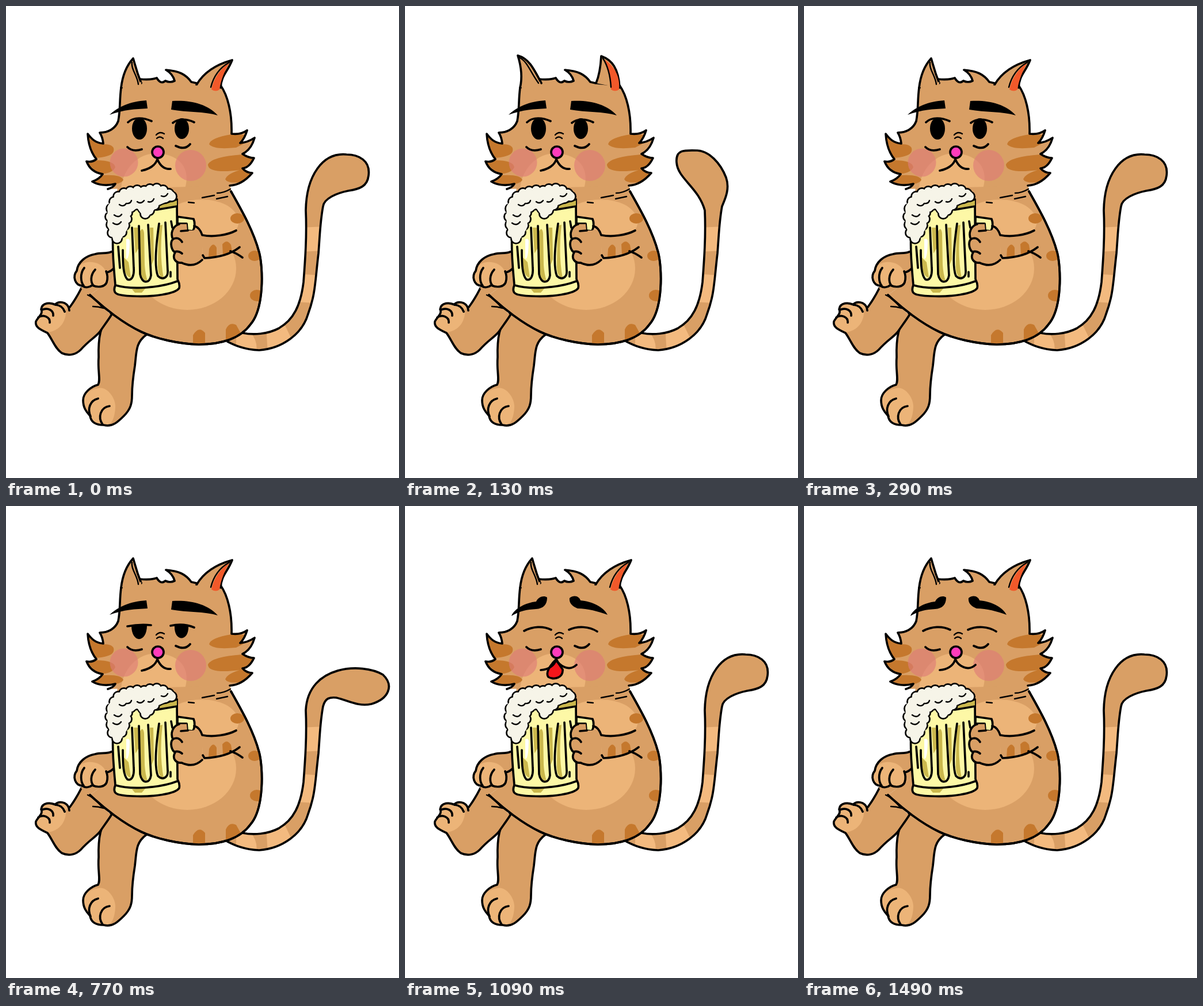
Recreate the animation shown at these times as an HTML page. Size 683 px wide and 820 px high, loop 1690 ms.

```html
<!DOCTYPE html>
<html lang="en">
<head>
<meta charset="utf-8">
<title>Cat with a mug</title>
<style>
  html, body { margin: 0; height: 100%; overflow: hidden; background: #fff; }
  svg { display: block; width: 100%; height: 100%; }
  path, circle { stroke-linecap: round; stroke-linejoin: round; }
  .fur { fill: #d99f65; }
  .light { fill: #ecb478; }
  .pale { fill: #f3ba7f; }
  .dark { fill: #c5782d; }
  .olive { fill: #cbb84d; }
  .glass { fill: #fdf8a6; }
  .ink { stroke: #000; stroke-width: 3.7; }
  .line { fill: none; stroke: #000; stroke-width: 3.7; }
  .thin { stroke-width: 2.4; }
  .foam { fill: none; stroke: #f6f4e8; }
</style>
</head>
<body>
<svg viewBox="0 0 683 820">
  <defs>
    <path id="body" d="M391,322C408,352 430,390 440,428C447,455 449,525 425,553C408,577 375,588 335,588C300,587 260,578 235,566C205,552 170,525 146,502"/>
    <path id="head" d="M177,318Q187,315 190,309C175,313 160,311 150,305Q162,301 168,292C155,290 145,283 140,270Q150,272 157,266C148,255 143,240 142,222C148,230 155,238 169,239Q168,228 163,220C178,220 190,213 195,200C199,180 197,165 200,142L233,127Q250,129 262,125Q269,137 277,130Q285,134 293,130Q290,118 278,111C300,113 312,118 322,132L331,134L373,138C385,155 393,185 392,222Q408,224 419,216Q415,230 407,238Q420,237 432,229Q426,250 411,257Q421,264 431,264Q423,281 411,282Q418,290 428,290Q410,311 389,312"/>
    <path id="leg" d="M182,535C163,552 160,580 161,610C159,635 165,650 160,658C148,661 134,672 134,685C134,700 142,707 146,712C148,725 160,728 170,728C185,732 195,722 205,712C217,700 219,690 219,676C219,665 220,650 224,625C227,600 225,585 244,571"/>
    <path id="paw" d="M301,379C290,382 285,395 290,405C284,412 288,425 294,428C288,438 295,447 305,446C320,453 332,450 341,441"/>
    <path id="foam" d="M193,404h0M185,394h0M183,380h0M181,366h0M183,352h0M188,340h0M195,331h0M205,325h0M216,322h0M228,320h0M240,321h0M250,318h0M262,317h0M273,320h0M283,326h0M288,331h0M277,334h0M265,338h0M258,346h0M249,355h0M242,361h0M238,352h0M228,345h0M217,350h0M211,359h0M210,370h0M206,381h0M201,393h0"/>
    <clipPath id="inBody"><use href="#body"/></clipPath>
    <clipPath id="inHead"><use href="#head"/></clipPath>
    <clipPath id="inTail"><path id="tailClip"/></clipPath>
  </defs>

  <!-- tail -->
  <path id="tail" class="fur"/>
  <path class="pale" clip-path="url(#inTail)" d="M510,385L555,383V425L510,427ZM505,465L545,468L535,516L505,514ZM452,555L480,545L498,582L455,605ZM400,560L424,565Q440,585 434,605H400Z"/>
  <path id="tailLine" class="line"/>

  <!-- standing leg -->
  <use href="#leg" class="fur"/>
  <path class="light" d="M160,664C175,660 190,680 190,695C190,712 184,728 176,728C155,728 147,722 146,712C135,702 134,695 134,685C136,672 148,666 160,664Z"/>
  <use href="#leg" class="line"/>
  <path class="line" d="M160,682C146,685 141,700 147,713M180,695C164,697 159,715 168,727"/>

  <!-- crossed leg -->
  <path class="fur" d="M133,488Q122,508 110,523L61,527C65,535 56,540 52,548C50,558 60,562 72,568C80,578 85,595 97,603C110,609 122,605 130,597C145,580 155,576 163,566L183,537L146,502Z"/>
  <path id="toe" class="light ink"/>
  <path class="light" d="M61,527C63,514 80,515 86,519L104,526C106,548 93,565 72,567C57,562 50,557 53,548C56,540 64,535 61,527Z"/>
  <path class="line" d="M131,490Q122,508 111,523M86,519C78,515 63,514 61,527C65,535 56,540 52,548C50,558 60,562 72,568C80,578 85,595 97,603C110,609 122,605 130,597C145,580 155,576 163,566C172,553 178,545 183,537M62,528C73,523 83,529 82,538M86,519Q98,520 102,531M56,541C66,535 77,541 76,550"/>

  <!-- body -->
  <path class="fur" d="M391,324L389,300H195L185,427L130,490L146,502Z"/>
  <use href="#body" class="fur ink"/>
  <ellipse class="light" cx="315" cy="456" rx="85" ry="72"/>
  <path class="light" d="M298,345C335,328 395,335 405,372Q405,385 396,392L340,400H298Z"/>
  <g class="dark" clip-path="url(#inBody)">
    <ellipse cx="402" cy="369" rx="12" ry="9"/>
    <ellipse cx="432" cy="434" rx="11" ry="9"/>
    <ellipse cx="436" cy="503" rx="12" ry="10"/>
    <path d="M382,585V562Q388,548 400,554L410,572V590ZM325,592V572Q335,555 346,568V592Z"/>
  </g>
  <use href="#body" class="line"/>
  <path class="line thin" d="M142,502Q155,508 166,522M151,522Q160,522 170,525"/>

  <!-- head -->
  <use href="#head" class="fur"/>
  <g clip-path="url(#inHead)">
    <path class="light" d="M200,320C200,290 225,255 262,256C305,258 322,285 310,320Z"/>
    <path class="dark" d="M135,212L168,240Q190,240 187,252Q185,262 155,264ZM135,265L157,268Q188,268 190,280Q185,292 160,292ZM145,305L168,294Q200,292 204,302Q200,312 160,312ZM440,225L392,223Q355,229 353,240Q360,250 400,246ZM440,260L410,258Q358,262 351,275Q350,288 385,287L420,284ZM435,287L411,284Q385,290 381,301Q385,309 410,306Z"/>
  </g>
  <use href="#head" class="line"/>
  <path class="line thin" d="M341,333L362,329M367,325Q378,325 390,318M366,335L385,331M317,341L327,342"/>
  <path id="earL" class="fur ink"/>
  <path id="earR" class="fur ink"/>
  <path class="fur" d="M203,141L235,132V145L203,150ZM329,138L371,140V153L329,145Z"/>
  <path id="earIn" fill="#f1592a"/>
  <path id="earLines" class="line thin"/>
  <g fill="#df7d77" fill-opacity=".65">
    <circle cx="205" cy="272" r="24.5"/>
    <circle cx="321" cy="277" r="27"/>
  </g>
  <path class="line" d="M211,245Q220,254 236,249M295,243Q311,251 320,240"/>
  <path class="line thin" d="M261,224Q267,217 275,222M262,230Q267,225 273,230"/>
  <path id="eyes"/>
  <path id="lids" class="line"/>
  <path id="brows"/>
  <path id="tongue" class="ink" fill="#f5151b"/>
  <path id="mouth" class="line"/>
  <circle class="ink" cx="264" cy="254" r="10" fill="#ff3cbb"/>

  <!-- resting paw -->
  <path class="fur" d="M187,424C175,431 165,428 155,431C138,434 125,445 123,460C115,470 120,485 132,486C138,490 145,489 150,485C160,490 172,488 175,480L190,456Z"/>
  <path class="light" d="M123,460C126,448 140,442 155,446C170,450 178,462 175,480C170,488 160,490 150,485C145,489 138,490 132,486C118,483 117,470 123,460Z"/>
  <path class="line" d="M183,427C175,431 165,428 155,431C138,434 125,445 123,460C115,470 120,485 132,486C138,490 145,489 150,485C160,490 172,488 175,480Q178,470 174,461M136,455C128,465 130,480 135,486M155,458C146,468 147,480 152,486M175,463Q183,461 188,455"/>

  <!-- mug -->
  <path class="glass ink" d="M186,400C184,430 189,470 190,485C184,500 192,503 220,504C255,506 295,500 301,490C303,480 298,478 298,474L297,336L255,345L200,360Z"/>
  <path class="olive" d="M260,348L297,335V349L260,354ZM203,435L213,445L217,472Q204,470 203,435ZM222,385L229,385L231,420L225,430ZM231,395Q238,380 240,395L241,450Q242,465 246,478Q234,476 233,465ZM250,385H256L257,440L253,450ZM265,382L272,380Q266,430 274,473Q263,470 264,450ZM219,492L243,490L236,498L224,498Z"/>
  <path fill="#fff" d="M209,405Q217,402 215,414Q214,440 209,439Z"/>
  <path class="line" d="M260,347L297,336M262,354L297,348M190,485C220,494 270,489 298,478M195,418L198,455M203,424C203,450 204,468 211,475C219,478 223,468 222,455L219,385M231,382L233,466C236,483 250,483 252,468L247,380M266,378C260,420 258,455 264,469C272,477 282,472 281,460L277,376M287,374L289,385M286,462V470"/>
  <path class="glass ink" d="M298,366L326,370Q330,380 325,391L315,390L314,378L298,378Z"/>
  <use href="#foam" class="line" style="stroke-width:20"/>
  <path class="foam" stroke-width="15" style="fill:#f6f4e8" d="M193,402L184,380L184,350L198,331L250,321L286,329L260,340L243,359L230,341L208,355L204,385Z"/>
  <use href="#foam" class="foam" stroke-width="14.5"/>
  <path class="line thin" d="M188,363Q196,369 201,362M186,377Q194,383 200,375M197,345Q204,350 209,343Q216,344 218,338M228,340Q234,345 240,338M247,340Q254,342 257,335M270,330Q277,333 281,326"/>

  <!-- holding paw -->
  <path class="fur" d="M340,398Q380,403 400,390L412,420Q385,435 342,438Z"/>
  <path class="dark" d="M352,437L353,422Q360,408 366,420V436ZM377,432L376,414Q384,404 391,415L393,427Z"/>
  <path class="fur" d="M301,379L314,379L315,390H325Q335,385 341,398V441L305,446Z"/>
  <use href="#paw" class="fur"/>
  <use href="#paw" class="line"/>
  <path class="line" d="M327,382Q337,385 341,398M290,405Q300,400 306,410M293,427Q300,425 306,430M304,391L316,390M341,398C360,402 385,398 400,390M342,433L345,438C370,437 392,430 406,419M390,426Q400,429 411,437"/>
  <g id="bubbles" fill="#fff" stroke="#000" stroke-width="2">
    <circle cx="191" cy="299" r="3.5"/>
    <circle cx="209" cy="303" r="4"/>
    <circle cx="217" cy="293" r="5.5"/>
    <circle cx="229" cy="303" r="3.5"/>
  </g>
</svg>
<script>
const el = id => document.getElementById(id);
const draw = (id, d) => el(id).setAttribute('d', d);

// Halfway pose between two paths of the same structure
const half = (a, b) => {
  const n = b.match(/\d+/g);
  let i = 0;
  return a.replace(/\d+/g, v => (+v + +n[i++]) / 2);
};

const tails = {
  right: 'C553,334 575,325 595,321C615,318 628,313 630,295C634,268 612,258 592,258C550,254 522,295 521,355',
  left: 'C556,336 565,318 558,298C548,272 528,252 508,251C484,250 470,250 472,272C474,300 510,315 521,355',
  up: 'C558,325 572,300 572,275C570,250 555,243 543,243C520,243 508,258 508,278C508,305 520,325 521,355',
  low: 'C555,333 563,332 574,333C595,338 612,349 635,344C665,335 675,312 655,293C620,272 525,275 521,355'
};
tails.mid = half(tails.low, tails.right);
const tailPath = top => 'M385,583C395,588 412,597 440,598C480,595 515,570 525,535C538,500 537,480 543,430C546,390 546,375 551,348'
  + top + 'C523,400 520,440 517,480C512,520 500,545 474,560C455,570 430,572 411,568';

const earParts = ['earL', 'earR', 'earIn', 'earLines'];
const ears = {
  rest: ['M200,142C202,125 208,105 221,91C224,100 226,112 235,134',
    'M331,137C342,118 360,103 393,94C385,115 374,120 373,142',
    'M388,99C370,110 360,130 357,145Q365,150 371,145C373,130 380,112 388,99Z',
    'M219,98C217,110 228,120 230,136M388,98C370,108 360,125 356,141'],
  back: ['M200,142C204,125 202,105 196,86C214,91 222,105 237,134',
    'M332,134C338,120 340,105 341,87C360,94 371,108 373,142',
    'M345,92C353,105 357,125 358,145Q365,150 372,145C374,125 366,105 345,92Z',
    'M199,90C212,95 218,115 232,134M344,91C353,105 357,125 358,141']
};
ears.half = ears.rest.map((d, i) => half(d, ears.back[i]));

const eyes = {
  open: ['M219,213a13,19 0 1 0 26,0a13,19 0 1 0 -26,0M293,213a12.5,18 0 1 0 25,0a12.5,18 0 1 0 -25,0',
    'M212,202C222,192 240,194 253,200M290,203C300,195 315,196 327,202'],
  half: ['M218,208C218,239 245,239 245,207ZM293,207C291,237 319,237 317,207Z',
    'M211,209Q232,205 252,207M286,208Q308,203 327,211'],
  shut: ['', 'M207,217C222,209 240,208 254,215M285,215C300,208 320,209 334,218']
};
const brows = {
  flat: 'M180,189C195,175 215,166 244,164L246,178C225,179 205,180 180,189ZM289,165C320,163 350,170 368,190C345,183 315,185 287,180Z',
  short: 'M187,187C200,172 220,166 244,164L246,178C225,180 205,182 187,187ZM289,165C315,165 340,172 351,187C330,183 310,183 287,180Z',
  sad: 'M185,191C190,178 210,168 228,166C232,157 242,155 247,159C247,172 240,178 228,179C212,180 200,182 185,191ZM286,160C295,153 303,158 305,164C325,166 345,175 352,189C335,183 318,178 300,178C290,174 285,168 286,160Z'
};
const smile = 'M236,285C250,284 260,277 263,266C268,278 285,288 298,276';
const mouths = {
  frown: ['M236,286C250,283 260,276 263,266C268,278 276,284 286,283', ''],
  smile: [smile, ''],
  lick: [smile, 'M262,267C251,276 246,286 250,292C258,300 270,294 271,282Q268,272 262,267Z'],
  wide: [smile, 'M262,267C251,278 244,290 249,297C260,303 275,298 274,284Q268,275 262,267Z']
};
const toes = {
  down: 'M86,518C92,512 105,514 109,524L110,529',
  half: 'M86,519C89,508 100,505 107,512Q109,517 110,526',
  up: 'M86,520C86,505 95,497 104,501C112,506 105,514 111,523'
};

// start, tail, ears, eyes, brows, mouth, toe, bubble rise
const idle = ['right', 'rest', 'open', 'flat', 'frown', 'down'];
const calm = (...face) => ['right', 'rest', ...face];
const poses = [
  [0, ...idle],
  [50, 'up', 'half', ...idle.slice(2)],
  [130, 'left', 'back', ...idle.slice(2)],
  [210, 'up', 'half', ...idle.slice(2)],
  [290, ...idle],
  [770, 'low', 'rest', 'half', 'flat', 'frown', 'down'],
  [850, 'mid', 'rest', 'half', 'flat', 'frown', 'down'],
  [930, ...calm('half', 'short', 'lick', 'down')],
  [1010, ...calm('half', 'short', 'wide', 'down')],
  [1090, ...calm('shut', 'sad', 'wide', 'down')],
  [1170, ...calm('shut', 'sad', 'wide', 'half'), -6],
  [1250, ...calm('shut', 'sad', 'wide', 'up'), 0],
  [1330, ...calm('shut', 'sad', 'lick', 'half'), 6],
  [1410, ...calm('shut', 'sad', 'smile', 'down')]
];

function show([, tail, ear, eye, brow, mouth, toe, rise]) {
  const d = tailPath(tails[tail]);
  ['tail', 'tailClip', 'tailLine'].forEach(id => draw(id, d));
  earParts.forEach((id, i) => draw(id, ears[ear][i]));
  draw('eyes', eyes[eye][0]);
  draw('lids', eyes[eye][1]);
  draw('brows', brows[brow]);
  draw('mouth', mouths[mouth][0]);
  draw('tongue', mouths[mouth][1]);
  draw('toe', toes[toe]);
  el('bubbles').style.display = rise === undefined ? 'none' : '';
  el('bubbles').setAttribute('transform', `translate(0 ${-(rise || 0)})`);
}

function tick() {
  const t = performance.now() % 1690;
  show(poses.findLast(pose => pose[0] <= t));
  requestAnimationFrame(tick);
}
tick();
</script>
</body>
</html>
```
